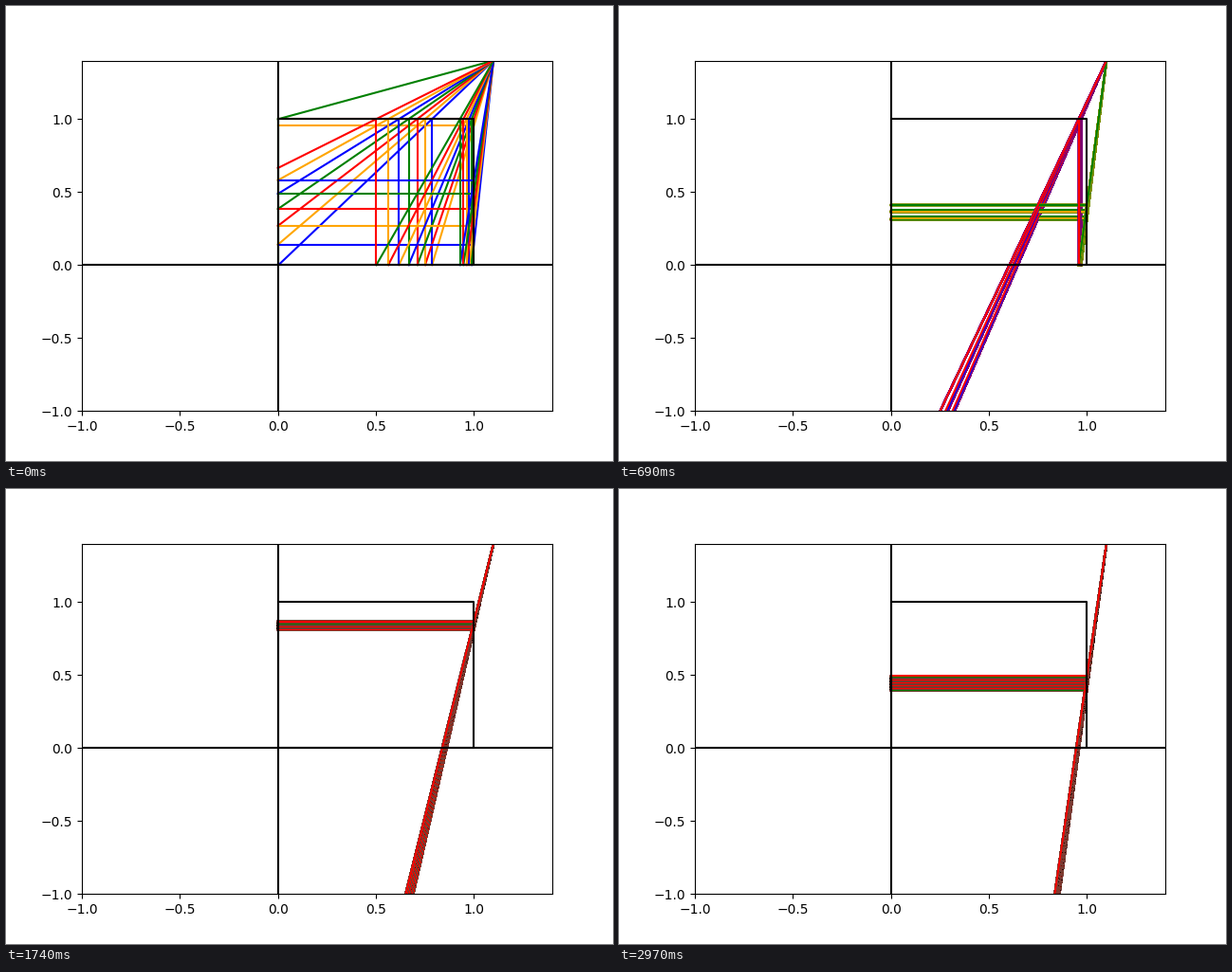
Recreate the animation shown at these times as a matplotlib script. Size 640x480 px, loop 3000 ms.

```python
import numpy as np
import matplotlib.pyplot as plt
from matplotlib.animation import FuncAnimation
from matplotlib.collections import LineCollection

FRAMES = 100
STEPS = 200            # bounces added per frame
SHOWN = STEPS // 10    # only the latest tenth of the orbit is visible
APEX = (1.1, 1.4)
COLORS = ["red", "green", "blue", "orange"]


def bounce(x, y):
    """Follow the ray to the apex until it leaves the unit square."""
    slope = (APEX[1] - y) / (APEX[0] - x)
    right = y + (1 - x) * slope
    if right <= 1:
        return (1, right), (0, right)
    top = x + (1 - y) / slope
    return (top, 1), (top, 0)


def build_orbit():
    """Pairs of segments (ray, perpendicular) for the whole loop."""
    segments = []
    x, y = 0.2, 0.0
    for shift in np.linspace(0, 10, FRAMES):
        for _ in range(STEPS):
            start = (x, y - shift) if x == 0 else (x, y)
            hit, foot = bounce(*start)
            segments += [(start, APEX), (hit, foot)]
            x, y = foot
    return np.array(segments, dtype=float)


orbit = build_orbit()
# Two segments per bounce share a colour; older bounces lie on top.
palette = [c for c in reversed(COLORS) for _ in range(2)]

fig, ax = plt.subplots(figsize=(6.4, 4.8), dpi=100)
ax.set_xlim(-1, 1.4)
ax.set_ylim(-1, 1.4)
ax.axhline(0, color="black")
ax.axvline(0, color="black")
ax.plot([0, 1, 1, 0, 0], [0, 0, 1, 1, 0], color="black")

rays = LineCollection([], colors=palette, linewidths=1.5,
                      capstyle="projecting", zorder=1)
ax.add_collection(rays, autolim=False)


def update(k):
    end = 2 * STEPS * (k + 1)
    begin = end - 2 * SHOWN * (k + 1)
    rays.set_segments(orbit[begin:end][::-1])
    return [rays]


anim = FuncAnimation(fig, update, frames=FRAMES, interval=30,
                     repeat=True, repeat_delay=0, blit=False)
plt.show()
```
